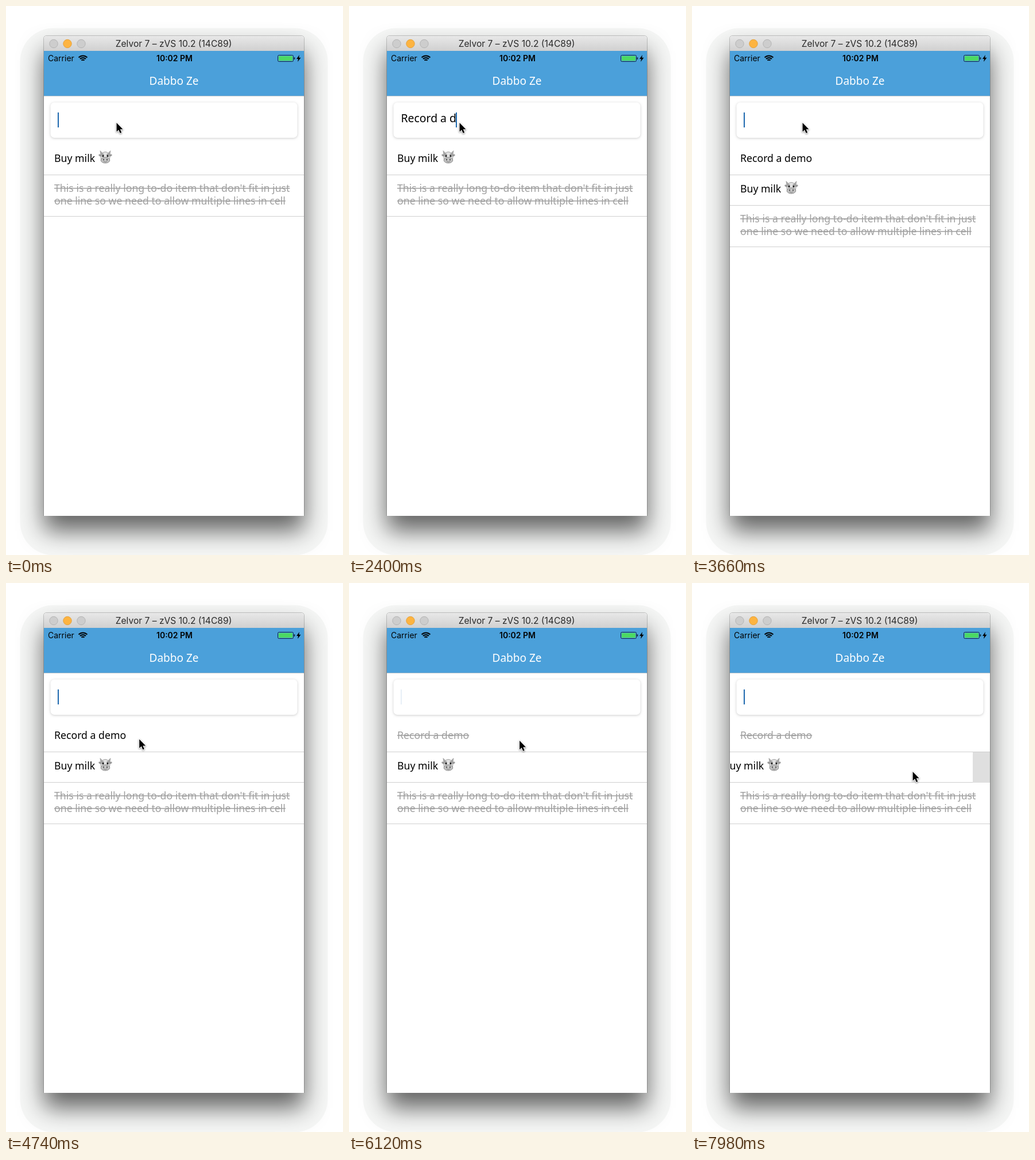
Write an HTML page with a canvas that moves like this. It is 587 px wide and 954 px high and loops after 8 s.

```html
<!DOCTYPE html>
<html lang="en">
<head>
<meta charset="utf-8">
<title>To-do list</title>
<style>
html, body { margin: 0; width: 100%; height: 100%; overflow: hidden; background: #fff; }
canvas { display: block; width: 587px; height: 954px; }
</style>
</head>
<body>
<canvas id="stage" width="587" height="954"></canvas>
<script>
const ctx = document.getElementById('stage').getContext('2d');
const LOOP = 8000, STEP = 60;
const LEFT = 66, WIDTH = 453, ROW = 53;
const BLUE = '#4ba0da', GRAY = '#a0a0a0', LINE = '#d0d0d0', PANEL = '#dfdfdf', GREEN = '#34aa60';
const LIST_FONT = '17.7px "Noto Sans", sans-serif';
const FIELD_FONT = '19.4px "Noto Sans", sans-serif';
const TITLE_FONT = '500 19px "Noto Sans", sans-serif';
const ui = (size, weight = 400) => `${weight} ${size}px Inter, sans-serif`;

const ENTRY = 'Record a demo';
const TYPING = 1500, KEY_GAP = 95, SUBMIT = 3340;
const DRAG = 4860, RELEASE = 5420, DONE = 5940, SECOND_DRAG = 7620;

const clamp = v => Math.max(0, Math.min(1, v));
const smooth = v => v * v * (3 - 2 * v);
const easeOut = v => 1 - (1 - v) ** 2;
const progress = (t, from, to, ease = smooth) => ease(clamp((t - from) / (to - from)));

const HOME = { x: 192, y: 202 };
const MOVES = [
  { from: 4260, to: 4800, x: 233, y: 273 },
  { from: DRAG, to: 5340, x: 296.5, y: 273, ease: easeOut },
  { from: 6120, to: 7140, x: 452, y: 349 },
  { from: 7200, to: SECOND_DRAG, x: 414, y: 327 },
  { from: SECOND_DRAG, to: 8340, x: 374, y: 327, ease: easeOut }
];

function pointerAt(t) {
  return MOVES.reduce((p, move) => {
    const k = progress(t, move.from, move.to, move.ease);
    return { x: p.x + (move.x - p.x) * k, y: p.y + (move.y - p.y) * k };
  }, HOME);
}

// A dragged row follows the pointer.
const dragSince = (t, start) => t < start ? 0 : pointerAt(t).x - pointerAt(start).x;

function rect(x, y, w, h, color) {
  ctx.fillStyle = color;
  ctx.fillRect(x, y, w, h);
}

function shape(color, build, stroke, width = 1) {
  ctx.beginPath();
  build(ctx);
  if (color) { ctx.fillStyle = color; ctx.fill(); }
  if (stroke) { ctx.strokeStyle = stroke; ctx.lineWidth = width; ctx.stroke(); }
}

const poly = points => c => points.forEach(([x, y], i) => i ? c.lineTo(x, y) : c.moveTo(x, y));
const oval = (x, y, rx, ry = rx, turn = 0) => c => c.ellipse(x, y, rx, ry, turn, 0, 7);
const rounded = (x, y, w, h, r) => c => c.roundRect(x, y, w, h, r);

function text(str, x, y, font, color = '#000', align = 'left') {
  ctx.font = font;
  ctx.fillStyle = color;
  ctx.textAlign = align;
  ctx.fillText(str, x, y);
}

function struck(str, x, y) {
  text(str, x, y, LIST_FONT, GRAY);
  rect(x, y - 6.5, ctx.measureText(str).width, 1.5, GRAY);
}

function scoped(draw, alpha = 1) {
  ctx.save();
  ctx.globalAlpha = alpha;
  draw();
  ctx.restore();
}

function shadow(alpha, blur, drop) {
  ctx.shadowColor = `rgba(0,0,0,${alpha})`;
  ctx.shadowBlur = blur;
  ctx.shadowOffsetY = drop;
}

function drawWindow() {
  rect(0, 0, 587, 954, '#fff');
  shape('#f6f7f6', rounded(24.5, 38.5, 536, 916, 58));
  const corners = [5, 5, 0, 0];
  shape(null, rounded(65.5, 51.5, WIDTH + 1, 834, corners), 'rgba(0,0,0,.2)');
  scoped(() => {
    shadow(.6, 42, 26);
    shape('#fff', rounded(LEFT, 52, WIDTH, 834, corners));
  });

  const metal = ctx.createLinearGradient(0, 52, 0, 78);
  metal.addColorStop(0, '#e8e8e8');
  metal.addColorStop(1, '#d0d0d0');
  shape(metal, rounded(LEFT, 52, WIDTH, 27, corners));
  ['#cdcdcd', '#fdb441', '#cdcdcd'].forEach((color, i) =>
    shape(color, oval(83 + 24 * i, 65.5, 7.2), i === 1 ? '#e5a13a' : '#b4b4b4'));
  text('Zelvor 7 – zVS 10.2 (14C89)', 292, 71, ui(15.6), '#2a2a2a', 'center');
}

function drawHeader() {
  rect(LEFT, 78, WIDTH, 78, BLUE);
  rect(LEFT, 156, WIDTH, 1, '#b9c4cc');
  text('Carrier', 73, 96, ui(14));
  text('10:02 PM', 293.5, 96, ui(14, 600), '#000', 'center');
  for (let r = 3.5; r < 11; r += 3.5)
    shape(null, c => c.arc(134, 97, r, -Math.PI * .75, -Math.PI * .25), '#000', 2.1);

  shape(null, rounded(473.5, 85.5, 27, 11, 2), '#10293a');
  rect(475, 87, 24, 8, '#4cd964');
  shape('#10293a', rounded(501.5, 89, 1.8, 4, 1));
  shape('#000', poly([[511, 85], [506, 92], [509, 92], [508, 97], [513.5, 89.7], [510.2, 89.7]]));
  text('Dabbo Ze', 292.5, 136.5, TITLE_FONT, '#fff', 'center');
}

// Solid while typing; otherwise fades out quickly and back in slowly.
function caretAlpha(t) {
  if (t >= TYPING && t < SUBMIT) return 1;
  const period = 1100, center = t < SUBMIT ? 780 : 6090;
  const d = (t - center + period * 8.5) % period - period / 2;
  return clamp(d < 0 ? -d / 180 : d / 300);
}

function drawField(t) {
  scoped(() => {
    shadow(.2, 4, 1);
    shape('#fff', rounded(77.5, 167.5, 430, 61.5, 7));
  });
  const count = Math.max(0, Math.floor((t - TYPING) / KEY_GAP) + 1);
  const typed = t < SUBMIT ? ENTRY.slice(0, count) : '';
  text(typed, 90.5, 202, FIELD_FONT);
  const x = Math.round(90 + ctx.measureText(typed).width);
  scoped(() => rect(x, 185, 2, 26, '#1c68ae'), caretAlpha(t));
}

function drawCow(x, y) {
  scoped(() => {
    ctx.translate(x, y);
    for (const side of [-1, 1]) {
      shape('#aaa', poly([[side * 4, -6], [side * 9, -11], [side * 8, -4]]), '#888', .6);
      shape('#999', oval(side * 9, -3, 2.8, 1.8, side * -.35));
    }
    shape('#e2e2e2', oval(0, 0, 8, 9), '#8a8a8a', .8);
    shape('#c2c2c2', oval(0, 5.5, 7.8, 5), '#777', .8);
    for (const side of [-1, 1]) {
      shape('#999', oval(side * 4.6, -3, 2, 3, side * -.25));
      shape('#111', oval(side * 3.8, -1.8, 1.3, 1.6));
      shape('#444', oval(side * 3, 4.5, 1, 1.3));
    }
    shape(null, c => c.arc(0, 4.5, 4, .6, 2.54), '#666', .7);
  });
}

function drawCheck() {
  scoped(() => {
    ctx.lineCap = 'round';
    shape(null, oval(92.5, 267, 12.8), '#fff', 1.4);
    shape(null, poly([[87, 267], [91.5, 271.5], [103, 258.5]]), '#fff', 1.4);
  });
}

// The row and its separator slide sideways over a coloured action panel.
function drawRow(shift, panel, icon, content) {
  scoped(() => {
    ctx.beginPath();
    ctx.rect(LEFT, 241, WIDTH, ROW);
    ctx.clip();
    rect(LEFT, 241, WIDTH, ROW, panel);
    if (icon) icon();
    ctx.translate(shift, 0);
    rect(LEFT, 241, WIDTH, ROW, '#fff');
    rect(LEFT, 293, WIDTH, 1, LINE);
    content();
  }, ctx.globalAlpha);
}

function drawList(t) {
  const grown = progress(t, SUBMIT, 3620);
  const released = t > RELEASE;
  const shift = released
    ? dragSince(RELEASE, DRAG) * (1 - progress(t, RELEASE, 5640, easeOut))
    : dragSince(t, DRAG);
  const armed = released || shift > 48;
  scoped(() => drawRow(shift, armed ? GREEN : PANEL, armed && drawCheck, () =>
    t < DONE ? text(ENTRY, 84, 270.5, LIST_FONT) : struck(ENTRY, 84, 270.5)), grown);

  scoped(() => {
    ctx.translate(0, Math.round(ROW * grown));
    drawRow(dragSince(t, SECOND_DRAG), PANEL, null, () => {
      text('Buy milk', 84, 270.5, LIST_FONT);
      drawCow(173, 262.5);
    });
    struck("This is a really long to-do item that don't fit in just", 84, 322.5);
    struck('one line so we need to allow multiple lines in cell', 84, 344.5);
    rect(LEFT, 365, WIDTH, 1, LINE);
  });
}

function drawPopup(t) {
  scoped(() => {
    shape('#0e1620', rounded(78, 120, 84.5, 43.5, 9));
    shape('#0e1620', poly([[88, 163], [99.5, 174], [111, 163]]));
    text('Paste', 120.5, 147.5, ui(16), '#fff', 'center');
  }, progress(t, 420, 600) - progress(t, 1080, 1260));
}

function drawPointer(t) {
  const { x, y } = pointerAt(t);
  scoped(() => {
    ctx.translate(x + .6, y + 1);
    ctx.lineJoin = 'round';
    const arrow = c => {
      poly([[0, 0], [0, 15.5], [3.6, 12.2], [6.1, 18], [8.7, 16.9], [6.2, 11.3], [11, 11.3]])(c);
      c.closePath();
    };
    scoped(() => {
      shadow(.35, 3, 1);
      shape('#fff', arrow, '#fff', 2);
    });
    shape('#000', arrow);
  });
}

function draw(now) {
  const time = now % LOOP, t = time - time % STEP;
  drawWindow();
  drawHeader();
  drawList(t);
  drawField(t);
  drawPopup(t);
  drawPointer(t);
}

const start = performance.now();
function tick() {
  draw(performance.now() - start);
  requestAnimationFrame(tick);
}
tick();
</script>
</body>
</html>
```
